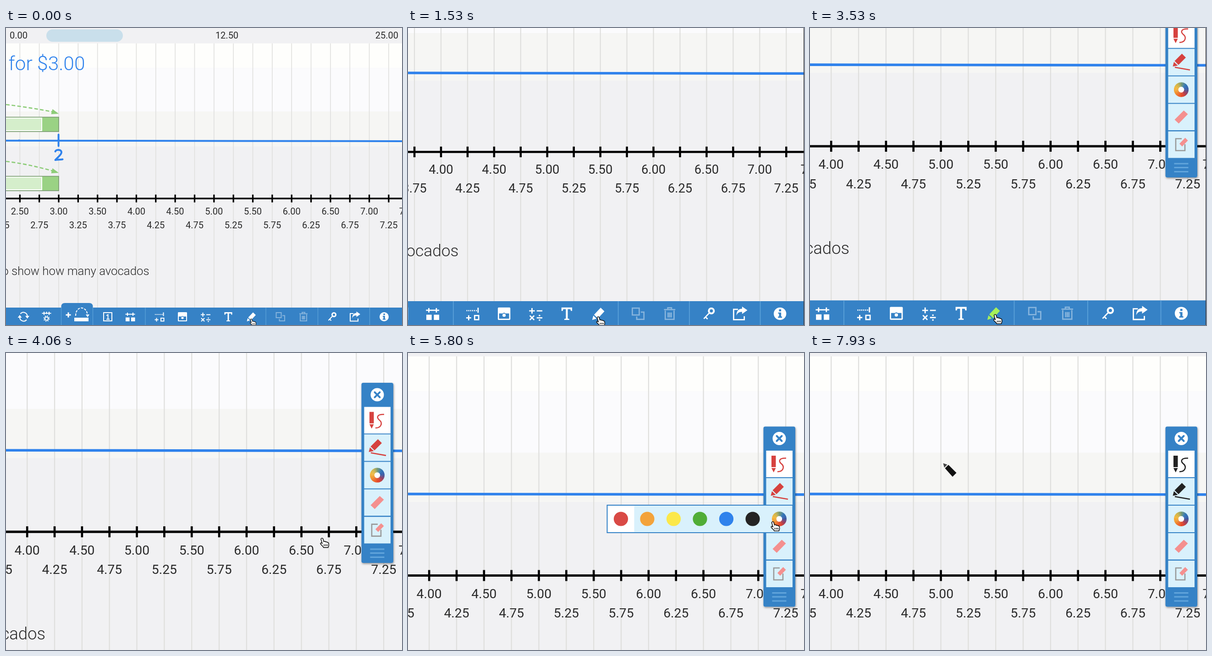
Write an HTML page that moves like this. It is 864 px wide and 648 px high and loops after 8 s.

```html
<!DOCTYPE html>
<html lang="en">
<head>
<meta charset="utf-8">
<title>Number line</title>
<style>
html, body { margin: 0; width: 100%; height: 100%; overflow: hidden; background: #f1f1f3; }
svg { display: block; width: 100%; height: 100%; }
text { font-family: Roboto, sans-serif; font-size: 20px; fill: #2a2a2a; }
.mid { text-anchor: middle; }
.end { text-anchor: end; }
.line { fill: none; stroke: #fff; stroke-width: 2; }
.ink { fill: none; stroke: #2f82ec; stroke-width: 4; stroke-linecap: round; stroke-linejoin: round; }
.cell { fill: #d9f1fc; }
</style>
</head>
<body>
<svg viewBox="0 0 864 648">
  <defs>
    <filter id="shadow" x="-20%" y="-5%" width="140%" height="110%">
      <feDropShadow dx="1" dy="2" stdDeviation="2" flood-opacity=".4"/>
    </filter>
  </defs>
  <g id="world">
    <rect width="880" height="660" fill="#f1f1f3"/>
    <rect y="33.6" width="880" height="54" fill="#fefefc"/>
    <rect y="87.5" width="880" height="95" fill="#fbfbfd"/>
    <rect y="182.4" width="880" height="76" fill="#f6f6f4"/>
    <g id="grid" stroke="#dfdfdd" stroke-width="1.6"></g>

    <rect x="88" y="3" width="167" height="27" rx="13.5" fill="#c9dfeb"/>
    <text x="8" y="23">0.00</text>
    <text class="mid" x="482" y="23">12.50</text>
    <text class="end" x="856" y="23">25.00</text>

    <text class="end" x="172.500" y="92" style="font-size:42.500px;font-weight:300;fill:#2f82ec">for $3.00</text>
    <text class="end" x="312.500" y="538.500" style="font-size:25.800px;font-weight:350;fill:#2a2a2a">to show how many avocados</text>

    <g id="bars"></g>

    <path class="ink" d="M-10 245.700L880 247M28.500 245.300v1M114.600 232.500v25"/>
    <path class="ink" d="M107.500 269.500c2-5 13-5 13.500 1.500 0 6-8.500 11-13.500 17 5-1.500 10 0 16-1.500"/>

    <path d="M-10 372H880" stroke="#000" stroke-width="3.600"/>
    <g id="ticks" stroke="#000" stroke-width="3.300"></g>
    <g id="labels" class="mid"></g>

    <g fill="#3682c6">
      <rect y="610" width="880" height="50"/>
      <path d="M120.500 650V608q0-8 8-8h53q8 0 8 8v42z"/>
    </g>
    <path d="M120.500 610V648M189.500 610V648M304 610V648M567 610V648M680.500 610V648M793.500 610V648" stroke="#5da3da" stroke-width="1.200"/>

    <g fill="#fff">
      <path class="line" d="M30 631a8.500 8.500 0 0 0 15 5.500M46.500 629a8.500 8.500 0 0 0-15-5.500"/>
      <path d="M25.500 632h9l-4.500-6zM42 628h9l-4.500 6z"/>
      <path class="line" d="M78.500 622.500h20M83 619v7M88.500 619v5M94 619v7"/>
      <circle class="line" cx="88.500" cy="634" r="3.600"/>
      <circle class="line" cx="88.500" cy="634" r="5.800" stroke-dasharray="2.200 2.355"/>
      <path class="line" style="stroke-width:3" d="M130.500 626h11M136 620.500v11"/>
      <path class="line" stroke-dasharray="5 2.500" d="M152 628c0-23 25-23 26 0"/>
      <path d="M174 625h8l-4 6z"/>
      <rect x="149" y="632" width="31" height="8"/>
      <rect class="line" x="213" y="621" width="18" height="18"/>
      <path class="line" d="M219 627.500l3.500-2v10M219 635.500h7"/>
      <path class="line" d="M260.500 624.500h21M265 621v7M277 621v7"/>
      <path d="M261 631.500h8.500v8.500h-8.500zM273 631.500h8.500v8.500H273z"/>
      <path class="line" stroke-dasharray="1.500 1.500" d="M325 625h17"/>
      <path class="line" d="M343.500 620.500v8M324.500 636.500h8M328.500 632.500v8M338 633h6.500v6.500h-6.500z"/>
      <rect x="375" y="620" width="20" height="20" rx="1.500"/>
      <path fill="#3682c6" d="M377 629.500h6a2.500 2.500 0 0 1 4 0h6v8.500h-16z"/>
      <circle cx="385" cy="632.500" r="2.600"/>
      <path class="line" d="M425 625.500h9M429.500 621v9M437 625.500h9M426 633l7 7M433 633l-7 7M437 636.500h9"/>
      <circle cx="441.500" cy="632.800" r="1.300"/><circle cx="441.500" cy="640.200" r="1.300"/>
      <path d="M476.500 620h17v5.500h-2l-.8-2.700h-4.200v15l2.500.5v1.700h-8v-1.700l2.500-.5v-15h-4.200l-.8 2.700h-2z"/>
      <path id="pen" d="M539 620.500l6 5.800-10.500 11.200-6-6zM527.300 633l5 5-6.800 2z"/>
      <g opacity=".4">
        <path class="line" d="M589.500 621h11v11h-11zM603 627.500h5v11.500h-11.500v-4.500"/>
        <path class="line" d="M640 623.500h18M646 623v-2.500h6v2.500M642 625v14h14v-14M646.500 628v8M649 628v8M651.500 628v8"/>
      </g>
      <circle class="line" cx="715.500" cy="625.500" r="4" style="stroke-width:3"/>
      <path class="line" d="M712.500 628.500l-9 9.500M706 635l3.500 3.500"/>
      <path class="line" d="M758 623h-7v16.500h17V634"/>
      <path d="M764.500 618.500l8.500 6-8.500 6v-3.500c-5 0-7.500 2-9 6 0-7 3-11 9-11z"/>
      <circle cx="825" cy="630" r="10"/>
      <path fill="#3682c6" d="M823.400 623h3.400v3.200h-3.400zM822 628h4.800v6.500h1.400v2h-6.400v-2h1.600v-4.500H822z"/>
    </g>

    <g id="ui">
      <g id="panel">
        <rect x="775.500" y="160.500" width="69.500" height="393" rx="4" fill="#3682c6" filter="url(#shadow)"/>
        <circle cx="810" cy="186.500" r="14.500" fill="#fff"/>
        <path d="M804.500 181l11 11M815.500 181l-11 11" stroke="#3682c6" stroke-width="4" stroke-linecap="round"/>
        <rect x="781.500" y="213" width="57.500" height="58" fill="#fff"/>
        <path class="cell" d="M781.500 273H839v58h-57.500zM781.500 333H839v58h-57.500zM781.500 393H839v57.500h-57.500zM781.500 453H839v58h-57.500z"/>
        <g id="tools" stroke-width="0">
          <path d="M793 224h9.500v25H793zM793 251h9.500l-4.700 9.500z"/>
          <path fill="none" stroke-width="2.500" d="M825 229.500c-16-1-17 7-10 12.500 7 6 4 17-9 17"/>
          <path d="M811.500 283.500l8.500 8.500-16 16-8.500-8.500zM794 301.500l8.500 8-11 2z"/>
          <path stroke-width="2.600" d="M796 313.200L829 319"/>
        </g>
        <path fill="#f4908f" d="M795.500 427.500L815.500 407.500l9 8L804.500 436z"/>
        <path fill="none" stroke="#999" stroke-width="2.600" d="M811 469h-13v26h20v-14"/>
        <path fill="#f4908f" d="M806 480l12.500-13 6 6L812 486z"/>
        <path d="M794.500 523.500h31M794.500 532h31M794.500 541h31" stroke="#62a5dc" stroke-width="3"/>
      </g>
      <g id="flyout">
        <rect x="434.500" y="332" width="405" height="60" fill="#d9f1fc" stroke="#3682c6" stroke-width="2"/>
        <rect x="436" y="333.500" width="57.500" height="57" fill="#fff"/>
      </g>
      <g id="wheel" fill="none" stroke-width="10"></g>
      <g id="cursor">
        <path id="hand" fill="#fff" stroke="#111" stroke-width="1.600" stroke-linejoin="round"
          d="M-7.500-7.500c.5-2.800 4-2.600 4.600-.3l1.600 5.800c2-1.500 3.700-.7 4.100.8 1.600-1 3.200-.2 3.600 1 1.800-.5 2.800.6 3 2l.2 4c0 2-1 3-1.400 5h-10c-1-3-4-4.500-6.300-7.300-1.500-2 .3-3.600 2.200-2.400l1.200 1zM-.5 4v3.500M2.800 4v3.500M6 4v3.500"/>
        <g id="pencil">
          <path fill="#444" d="M-14.500-14.500l9 3-6.500 6.500z"/>
          <path fill="#111" d="M-10.500-3.500l7.500-7.500L14.500 6.500 6 15z"/>
        </g>
      </g>
    </g>
  </g>
  <path id="edge" d="M863.500 0V648" stroke="#333" stroke-width="1"/>
</svg>
<script>
const $ = id => document.getElementById(id);
const add = (id, markup) => $(id).insertAdjacentHTML('beforeend', markup);
const LOOP = 8000, ZOOM = 1.413, PAN = 227.5;
const AX = 861.2, AY = 648; // fixed point of the zoom

// Quarter steps of the number line
for (let v = 2.25; v <= 7.5; v += 0.25) {
  const x = 115 + (v - 3) * 169.4;
  add('grid', `<path d="M${x} 33.600V610"/>`);
  add('ticks', `<path d="M${x} 363.500v17"/>`);
  add('labels', `<text x="${x}" y="${v % 0.5 ? 437 : 407}">${v.toFixed(2)}</text>`);
}

const bar = (y, tip, start) => add('bars', `
  <rect x="-20" y="${y}" width="135" height="31.500" fill="#9ad284" stroke="#73946c" stroke-width="1.500"/>
  <rect x="-20" y="${y + 2}" width="98" height="27.500" fill="#d5eecb" stroke="#fff" stroke-width="2"/>
  <path d="M0 ${start}Q50 ${start + 6} 102 ${tip - 4}" fill="none" stroke="#8dcc78" stroke-width="2.600" stroke-dasharray="8 4.500"/>
  <path d="M101.500 ${tip - 10}L115 ${tip}L98.500 ${tip + 1}z" fill="#8dcc78"/>`);
bar(194.5, 187, 167);
bar(323.5, 316, 291);

['#d94a45', '#f3a33a', '#fbe84a', '#50ad37', '#2f82ec', '#242424'].forEach((c, i) =>
  add('flyout', `<circle cx="${464.5 + i * 57.5}" cy="362" r="15.600" fill="${c}"/>`));

// Colour ring, clockwise from the top
const hues = [[110, 150, 120], [45, 115, 185], [55, 90, 165], [150, 60, 95], [224, 64, 42],
  [238, 100, 40], [242, 150, 46], [244, 185, 60], [205, 180, 75]];
const ringPoint = a => `${810 + 11 * Math.sin(a)} ${362 - 11 * Math.cos(a)}`;
for (let i = 0; i < 36; i++) {
  const a = i * Math.PI / 18, from = hues[i >> 2], to = hues[((i >> 2) + 1) % 9];
  const c = from.map((n, k) => Math.round(n + (to[k] - n) * (i % 4) / 4));
  add('wheel', `<path d="M${ringPoint(a)}A11 11 0 0 1 ${ringPoint(a + 0.19)}" stroke="rgb(${c})"/>`);
}
add('wheel', '<circle cx="810" cy="362" r="6.200" fill="#fff" stroke="none"/>');

// Smooth monotone curve through [time, value] keys
function track(t, keys) {
  const n = keys.length - 1;
  if (t <= keys[0][0]) return keys[0][1];
  if (t >= keys[n][0]) return keys[n][1];
  const i = keys.findIndex(k => k[0] > t) - 1;
  const rate = j => (keys[j + 1][1] - keys[j][1]) / (keys[j + 1][0] - keys[j][0]);
  const slope = j => {
    if (j === 0 || j === n) return 0;
    const a = rate(j - 1), b = rate(j);
    return a * b > 0 ? 2 * a * b / (a + b) : 0;
  };
  const [t0, v0] = keys[i], [t1, v1] = keys[i + 1];
  const d = t1 - t0, u = (t - t0) / d, w = 1 - u;
  return v0 * (1 + 2 * u) * w * w + v1 * u * u * (3 - 2 * u)
    + d * u * w * (slope(i) * w - slope(i + 1) * u);
}
const fade = (t, a, b) => Math.min(1, Math.max(0, (t - a) / (b - a)));

const zoomKeys = [[780, 0], [1130, 0.269], [1530, 0.891], [1860, 1]];
const panKeys = [[3530, 0], [3870, 0.27], [4250, 0.85], [4530, 0.965], [4680, 1]];
const reachKeys = [[3440, 0], [3530, 0.009], [3900, 0.5], [4340, 1]];

function cursorAt(t) {
  if (t >= 7630) {
    const k = 1 - (1 - fade(t, 7630, 7930)) ** 2;
    return [756 - 451 * k, 379 - 124 * k];
  }
  const reach = track(t, reachKeys), slide = track(t, [[5800, 0], [6460, 1]]);
  return [405.5 + 395.5 * reach - 45 * slide, 866.5 - 489 * reach + 1.5 * slide];
}

// Panel and cursor are drawn in the coordinates of the final view
$('ui').setAttribute('transform', `scale(${1 / ZOOM}) translate(${AX * (ZOOM - 1)} ${AY * (ZOOM - 1) - PAN})`);

function draw(t) {
  const s = 1 + (ZOOM - 1) * track(t, zoomKeys);
  const y = PAN * track(t, panKeys) - AY * (s - 1);
  $('world').setAttribute('transform', `translate(${-AX * (s - 1)} ${y}) scale(${s})`);

  const open = fade(t, 1965, 2055);
  $('panel').setAttribute('opacity', open);
  $('wheel').setAttribute('opacity', open);
  $('flyout').setAttribute('opacity', fade(t, 4825, 4925) * (1 - fade(t, 6830, 6990)));
  $('pen').setAttribute('fill', t >= 1995 ? '#a6f05a' : '#fff');

  const ink = t >= 6855 ? '#222' : '#d6423f';
  $('tools').setAttribute('fill', ink);
  $('tools').setAttribute('stroke', ink);

  const drawing = t >= 7655;
  $('hand').setAttribute('visibility', drawing ? 'hidden' : 'visible');
  $('pencil').setAttribute('visibility', drawing ? 'visible' : 'hidden');
  $('cursor').setAttribute('transform', `translate(${cursorAt(t)})`);
  $('edge').setAttribute('visibility', t > 1450 && t < 3900 ? 'visible' : 'hidden');
}

function tick() {
  draw(performance.now() % LOOP);
  requestAnimationFrame(tick);
}
tick();
</script>
</body>
</html>
```
